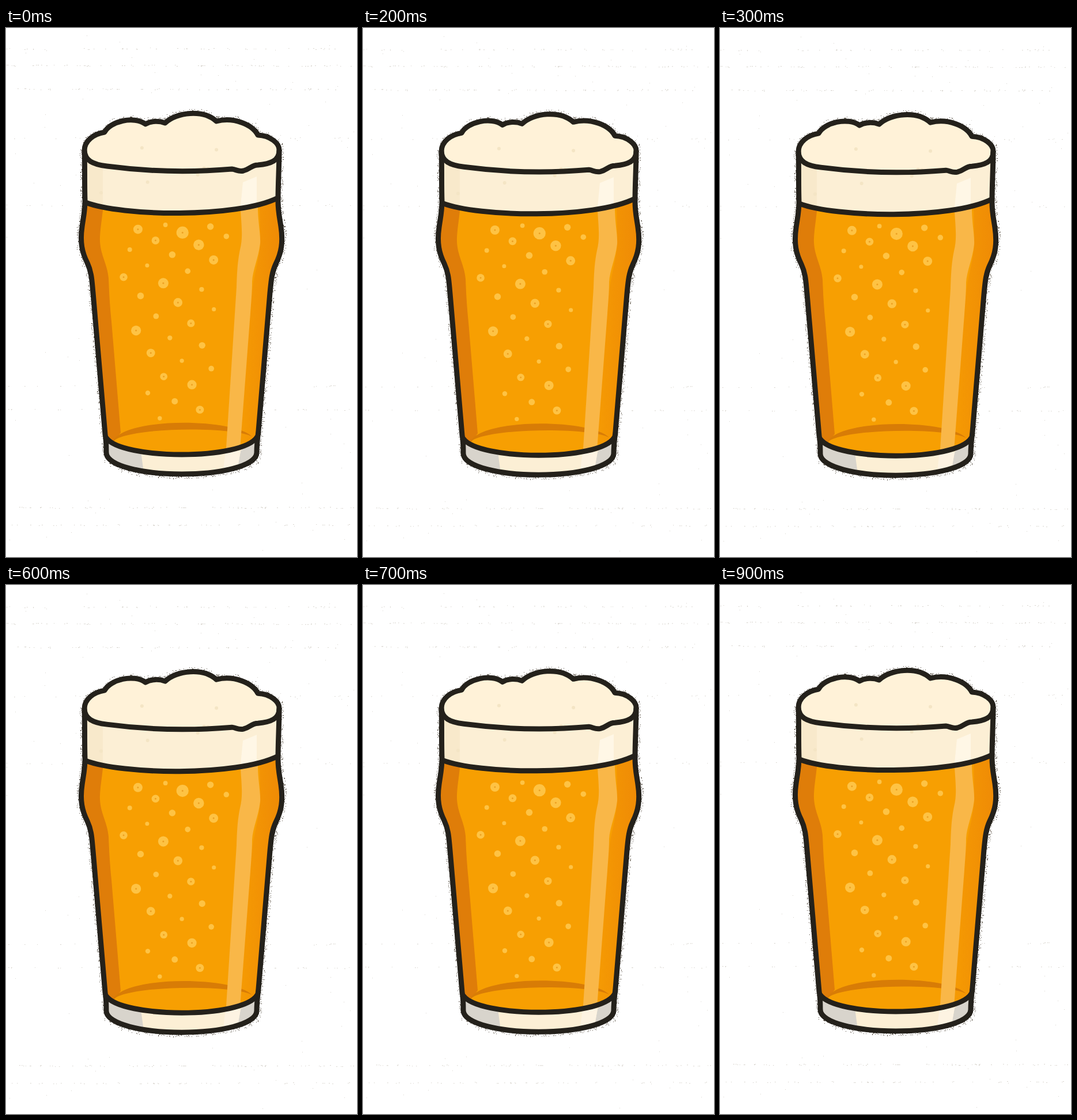
Recreate the animation shown at these times as an HTML page. Size 609x919 px, loop 1000 ms.

```html
<!DOCTYPE html>
<html lang="en">
<head>
<meta charset="utf-8">
<title>Pint of beer</title>
<style>
  html, body { margin: 0; width: 100%; height: 100%; overflow: hidden; background: #fff; }
  svg { display: block; width: 609px; height: 919px; }
  .line { fill: none; stroke: #24211b; stroke-width: 9; stroke-linejoin: round; stroke-linecap: round; }
</style>
</head>
<body>
<svg viewBox="0 0 609 919">
  <defs>
    <path id="outline" d="M136 213C136 196 152 184 171 181C181 162 222 152 242 167C252 161 266 161 276 165
      C296 146 342 141 365 162C395 154 428 168 437 186C458 187 475 200 474 213C474 240 472 270 472 300
      C472 320 475 330 477 345C481 372 478 390 468 410C461 425 460 440 458 460L438 700C436 716 435 725 435 738
      C434 761 372 775 305 775C238 775 175 761 174 738C174 725 174 716 172 706L151 460C149 440 149 425 141 408
      C132 390 128 372 132 345C134 330 137 318 137 300C136 270 137 240 136 213Z"/>
    <clipPath id="glass"><use href="#outline"/></clipPath>
    <clipPath id="beer"><path d="M100 303H138C200 327 400 331 472 295H520V710H436C410 752 200 750 174 712H100Z"/></clipPath>
    <linearGradient id="edge">
      <stop offset="0" stop-color="#ee8806" stop-opacity=".2"/>
      <stop offset="1" stop-color="#ee8806"/>
    </linearGradient>
  </defs>
  <g id="pint">
    <path id="dust" stroke="#d6d2cb" fill="none"/>
    <path id="fringe" stroke="#4f463a" fill="none"/>
    <g clip-path="url(#glass)">
      <path fill="#fcefd5" d="M120 130H490V790H120Z"/>
      <path fill="#fff2d8" d="M120 130H490V213C474 230 460 236 437 238L412 248L392 245C310 252 235 248 175 240L120 213Z"/>
      <path fill="#f8e9cb" d="M130 230L168 240V318H130Z"/>
      <path fill="#fff7e6" d="M411 268L435 258V312L406 320Z"/>
      <path fill="#d8d4cc" d="M170 700L234 735L240 780H170ZM407 735L440 700V780H399Z"/>
      <path fill="#fdf3e2" d="M381 735H407L400 775H376Z"/>
      <g id="foamSpots" fill="#f4e5c5"/>
      <g clip-path="url(#beer)">
        <path fill="#f79f02" d="M120 290H490V760H120Z"/>
        <path fill="#df7d09" d="M120 290H170C168 330 163 345 163 370C164 395 176 410 178 435C179 460 180 480 183 510L199 703L186 720L174 740H120Z"/>
        <path fill="url(#edge)" d="M440 300H490V720H406L425 480C426 440 441 400 441 370Z"/>
        <path fill="#d87c06" d="M187 715C215 676 395 678 427 710C395 692 215 693 187 717Z"/>
        <path fill="#f9b748" d="M406 300H437C436 335 442 355 441 374C438 400 428 420 427 440C427 460 425 480 424 495L405 745H381L400 450C401 420 402 405 406 385C412 362 408 340 406 300Z"/>
        <g id="bubbles" fill="#fec344"/>
      </g>
    </g>
    <g class="line">
      <use href="#outline"/>
      <path d="M136 213C137 230 150 237 175 240C235 248 310 252 392 245C400 246 403 250 412 248C424 245 426 238 437 238C460 236 474 230 474 213"/>
      <path d="M138 303C200 327 400 331 472 295M174 712C200 750 410 752 436 710"/>
    </g>
  </g>
</svg>
<script>
const $ = id => document.getElementById(id);

let seed = 7;
const random = () => (seed = seed * 16807 % 2147483647) / 2147483647;
const between = (a, b) => a + (b - a) * random();
const repeat = (count, make) => Array.from({ length: count }, (_, i) => make(i)).join('');
const circle = (x, y, r, attrs = '') => `<circle cx="${x}" cy="${y}" r="${r}" ${attrs}/>`;
const speck = (x, y, w = 1) => `M${Math.round(x)} ${Math.round(y) + .5}h${w}`;

// Bubbles thin out and draw together toward the bottom of the glass
const bubbleCount = 32;
$('bubbles').innerHTML = repeat(bubbleCount, i => {
  const depth = (i / (bubbleCount - 1)) ** 1.38;
  const x = 293 + (205 - 95 * depth) * ((.42 + i * .382) % 1 - .5);
  const y = 342 + 336 * depth;
  const r = 3.5 + (7.5 - 3 * depth) * ((.1 + i * .29) % 1) ** 1.3;
  return circle(x, y, r) + (r > 6 ? circle(x, y, 1.5, 'fill="#eda022"') : '');
});

$('foamSpots').innerHTML = repeat(7, () => circle(between(165, 410), between(185, 295), 3));

// Faint dotted rows and stray dots across the background
const rows = [36, 65, 106, 191, 308, 622, 663, 833, 863];
$('dust').setAttribute('d',
  rows.map(y => repeat(between(25, 75), () => speck(between(0, 607), y + between(-1, 1), between(1, 2)))).join('') +
  repeat(110, () => speck(between(0, 607), between(8, 907))));

// Rough specks hugging the outer edge
const outline = $('outline');
$('fringe').setAttribute('d', repeat(outline.getTotalLength() * 2, i => {
  const { x, y } = outline.getPointAtLength(i / 2);
  return speck(x + between(-8, 8), y + between(-8, 8));
}));

// Gentle vertical bob in ten held poses
const wave = step => Math.cos((step + .5) * Math.PI / 5);
function draw() {
  const step = Math.floor(performance.now() / 100) % 10;
  const y = 1.4 * (wave(0) - wave(step));
  $('pint').setAttribute('transform', `translate(0 ${y.toFixed(2)})`);
  requestAnimationFrame(draw);
}
draw();
</script>
</body>
</html>
```
